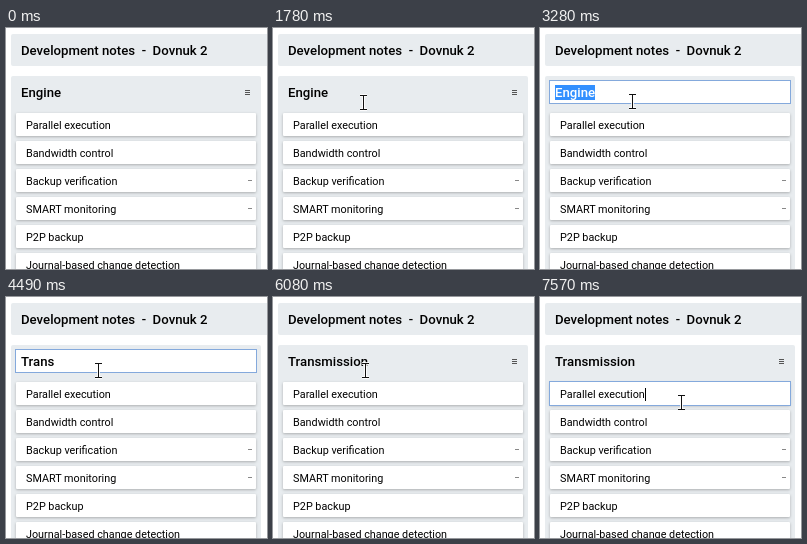
Animation, 261 px wide and 241 px high, one loop 8 s. Source, as an HTML page:

```html
<!DOCTYPE html>
<html lang="en">
<head>
<meta charset="utf-8">
<style>
  html, body { margin: 0; width: 100%; height: 100%; overflow: hidden; background: #fff; }
  body { position: relative; font: 10.8px Roboto, sans-serif; color: #000; }
  body div, svg { position: absolute; box-sizing: border-box; white-space: pre; }
  .panel { background: #e8ecef; border-radius: 2px; }
  .title, .heading { font-size: 13.2px; font-weight: 500; }
  .title { left: 5px; top: 6px; width: 270px; height: 32px; padding-left: 10px; line-height: 33px; }
  .list { left: 5px; top: 48px; width: 250px; height: 220px; }
  .heading { left: 9px; top: 52px; width: 242px; height: 24px; padding-left: 5px; line-height: 23px; }
  .row { left: 10px; width: 240px; height: 23px; padding-left: 10px; line-height: 26px;
         background: #fff; border-radius: 1px; box-shadow: 0 1px 3px #0004; }
  .dash { left: 232px; top: 11px; width: 4px; height: 1px; background: #888; }
  .menu { left: 239px; top: 62px; width: 5px; height: 5px; border: solid #555; border-width: 1px 0; }
  .menu::after { content: ""; position: absolute; top: 1px; width: 5px; height: 1px; background: #555; }
  .heading, .frame { border: 1px solid transparent; }
  .frame { left: 9px; top: 84px; width: 242px; height: 25px; padding-left: 10px; line-height: 26px; }
  .editing { background: #fff; border-color: #84a9dc; }
  .selected { background: #3390ff; color: #fff; }
  .caret { border-right: 1px solid #000; }
  #cursor { left: 0; top: 0; overflow: visible; width: 1px; height: 1px; fill: none; }
</style>
</head>
<body>
<div class="panel title">Development notes  -  Dovnuk 2</div>
<div class="panel list"></div>
<div class="heading" id="heading"><span id="name"></span></div>
<div class="menu" id="menu"></div>
<div class="frame editing" id="rowEditor"><span class="caret">Parallel execution</span></div>
<svg id="cursor">
  <path d="M-3.5-7H3.5M0-7V7M-3.5 7H3.5" stroke="#fff" stroke-width="3" stroke-opacity=".85"/>
  <path d="M-3.5-7H3.5M0-7V7M-3.5 7H3.5" stroke="#111"/>
</svg>
<script>
const LOOP = 8000;
const EDIT_START = 1840, EDIT_END = 6020, ROW_EDIT = 7510;
const NEW_NAME = "Transmission";
const keyTimes = [3740, 3940, 4100, 4300, 4490, 4550, 4680, 4810, 4970, 5170, 5230, 5430];
// time, x, y
const path = [
  [690, 30, 256], [930, 56, 71], [1060, 56, 71], [1490, 88, 74],
  [1620, 90, 74], [1780, 90, 74], [1840, 92, 73], [6810, 92, 73], [7320, 141, 105]
];
const rows = ["Parallel execution", "Bandwidth control", "Backup verification",
  "SMART monitoring", "P2P backup", "Journal-based change detection"];
const $ = id => document.getElementById(id);

rows.forEach((text, i) => {
  const row = document.createElement("div");
  row.className = "row";
  row.style.top = 85 + 28 * i + "px";
  row.textContent = text;
  if (i === 2 || i === 3) row.insertAdjacentHTML("beforeend", '<div class="dash"></div>');
  document.body.insertBefore(row, $("rowEditor"));
});

function cursorAt(t) {
  const next = path.findIndex(p => p[0] > t);
  if (next < 0) return path.at(-1).slice(1);
  const [t0, x0, y0] = path[next - 1], [t1, x1, y1] = path[next];
  const u = (t - t0) / (t1 - t0), k = u * u * (3 - 2 * u);
  return [x0 + (x1 - x0) * k, y0 + (y1 - y0) * k];
}

function draw(t) {
  const editing = t >= EDIT_START && t < EDIT_END;
  const typed = keyTimes.filter(k => k <= t).length;
  $("name").textContent = typed ? NEW_NAME.slice(0, typed) : "Engine";
  $("name").className = editing && !typed ? "selected" : "";
  $("heading").classList.toggle("editing", editing);
  $("menu").hidden = editing;
  $("rowEditor").hidden = t < ROW_EDIT;

  const visible = t >= path[0][0];
  $("cursor").style.display = visible ? "" : "none";
  if (visible) {
    // Half pixels keep the thin strokes sharp.
    const [x, y] = cursorAt(t).map(v => Math.round(v) + 0.5);
    $("cursor").style.transform = `translate(${x}px, ${y}px)`;
  }
}

function tick() {
  draw(performance.now() % LOOP);
  requestAnimationFrame(tick);
}
tick();
</script>
</body>
</html>
```
